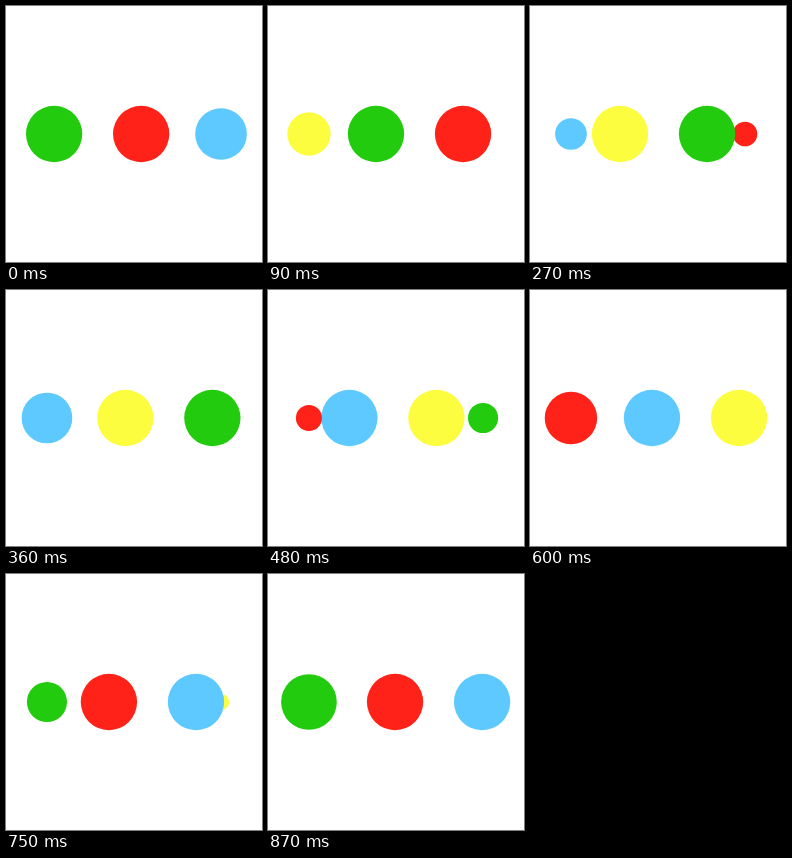
An HTML page with a canvas for the animation above (0.9 s loop, 256x256 px).

```html
<!DOCTYPE html>
<html lang="en">
<head>
<meta charset="utf-8">
<title>Ellipsis loader</title>
<style>
html, body { margin: 0; height: 100%; overflow: hidden; background: #fff; }
canvas { display: block; }
</style>
</head>
<body>
<canvas id="stage" width="256" height="256"></canvas>
<script>
const ctx = document.getElementById('stage').getContext('2d');
const LOOP = 900, RADIUS = 28.16, LEFT = 40.96, GAP = 87.04;
const COLORS = ['#5ec9ff', '#fdfd40', '#23cb0e', '#ff2218'];

// cubic-bezier(0, 0.5, 0.5, 1)
function ease(x) {
  let lo = 0, hi = 1;
  for (let i = 0; i < 24; i++) {
    const mid = (lo + hi) / 2;
    if (1.5 * mid ** 2 - 0.5 * mid ** 3 < x) lo = mid; else hi = mid;
  }
  return 1.5 * lo * (1 - lo) ** 2 + 3 * lo ** 2 * (1 - lo) + lo ** 3;
}

function dot(x, r, color) {
  ctx.fillStyle = color;
  ctx.beginPath();
  ctx.arc(x, 128, r, 0, 2 * Math.PI);
  ctx.fill();
}

function draw(time) {
  const beat = (time % LOOP) / LOOP * 4;
  const step = Math.floor(beat);
  const e = ease(beat - step);
  ctx.clearRect(0, 0, 256, 256);

  // The dot leaving on the right shrinks behind the others.
  dot(LEFT + 2 * GAP, RADIUS * (1 - e), COLORS[(4 - step) % 4]);

  COLORS.forEach((color, i) => {
    const phase = (i + step) % 4; // 0 leaving, 1 growing, 2 and 3 moving right
    if (phase === 1) dot(LEFT, RADIUS * e, color);
    else if (phase > 1) dot(LEFT + GAP * (phase - 2 + e), RADIUS, color);
  });
}

function tick() {
  draw(performance.now());
  requestAnimationFrame(tick);
}
tick();
</script>
</body>
</html>
```
